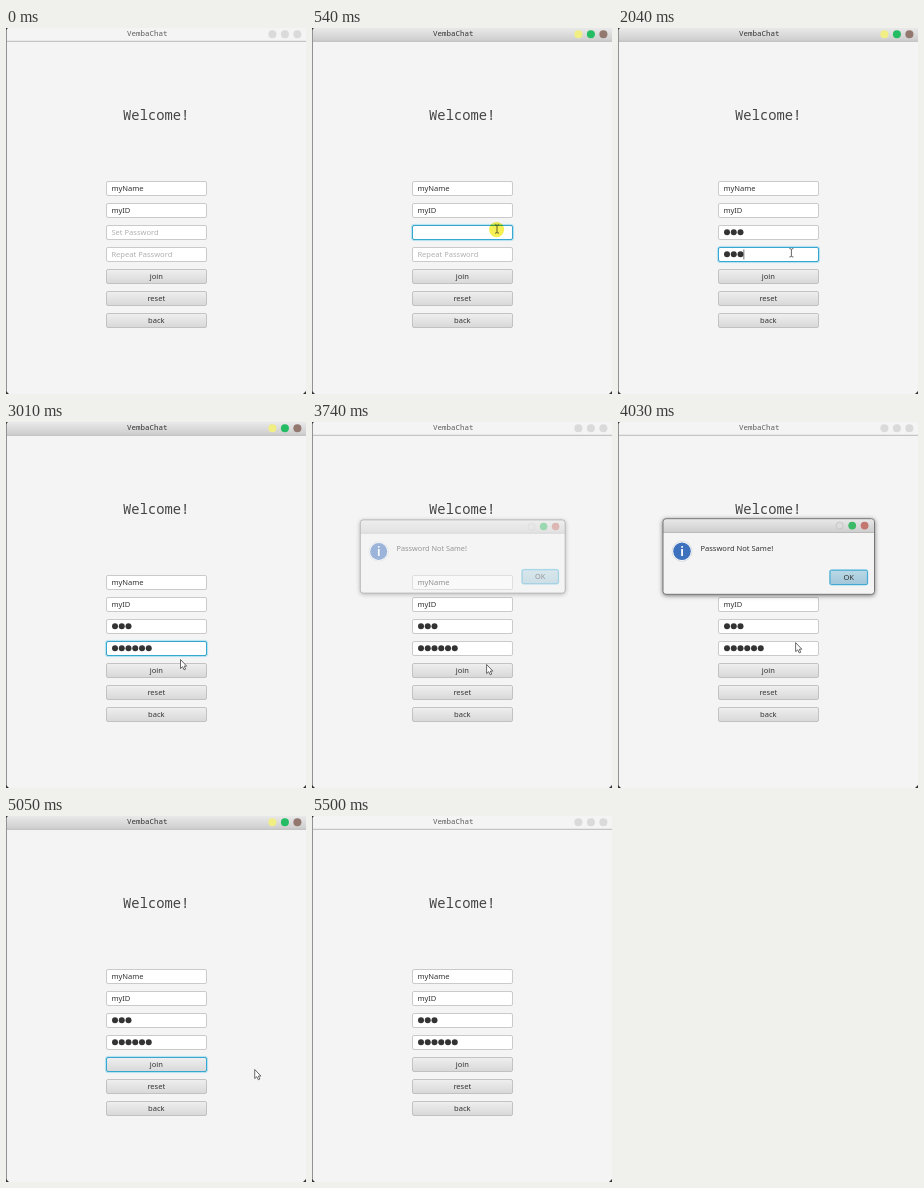
Recreate the animation shown at these times as an HTML page. Size 300 by 366 pixels, loop 5530 ms.

```html
<!DOCTYPE html>
<html lang="en">
<head>
<meta charset="utf-8">
<title>Sign up</title>
<style>
html, body { margin: 0; width: 100%; height: 100%; overflow: hidden; background: #f4f4f4; }
svg { display: block; width: 300px; height: 366px; }
text { font: 7.55px "Noto Sans", "Open Sans", sans-serif; fill: #333; }
.mono { font-family: "Noto Sans Mono", "DejaVu Sans Mono", monospace; }
.mid { text-anchor: middle; }
#title { font-size: 7.5px; }
#welcome { font-size: 13.8px; fill: #444; }
.prompt { fill: #b0b0b0; }
#dialog { filter: drop-shadow(0 1px 2px rgba(0, 0, 0, .5)); }
#click { mix-blend-mode: multiply; }
</style>
</head>
<body>
<svg id="stage" viewBox="0 0 300 366" xmlns="http://www.w3.org/2000/svg">
  <defs>
    <linearGradient id="bar" x2="0" y2="1"><stop stop-color="#e9e9e9"/><stop offset="1" stop-color="#cdcdcd"/></linearGradient>
    <linearGradient id="face" x2="0" y2="1"><stop stop-color="#efefef"/><stop offset="1" stop-color="#d8d8d8"/></linearGradient>
    <linearGradient id="pressed" x2="0" y2="1"><stop stop-color="#d9d9d9"/><stop offset="1" stop-color="#c4c4c4"/></linearGradient>
    <linearGradient id="okFace" x2="0" y2="1"><stop stop-color="#bbd9e6"/><stop offset="1" stop-color="#a2c7d9"/></linearGradient>
  </defs>
  <rect width="300" height="366" fill="#f4f4f4"/>
  <rect id="activeBar" width="300" height="13" fill="url(#bar)"/>
  <path d="M0 13.3H300" stroke="#b9b9b9"/>
  <path d="M.5 0V366" stroke="#929292"/>
  <path d="M0 0H2L0 2ZM0 366V363L3 366ZM300 366V363L297 366Z" fill="#333"/>
  <g fill="#dadada"><circle cx="266.4" cy="6.2" r="4"/><circle cx="278.9" cy="6.2" r="4"/><circle cx="291.4" cy="6.2" r="4"/></g>
  <g id="activeDots">
    <circle cx="266.4" cy="6.2" r="4" fill="#f1ee83"/>
    <circle cx="278.9" cy="6.2" r="4" fill="#24bd63"/>
    <circle cx="291.4" cy="6.2" r="4" fill="#92786f"/>
  </g>
  <text id="title" class="mono mid" x="141.2" y="8.3">VembaChat</text>
  <text id="welcome" class="mono mid" x="150.2" y="91.6">Welcome!</text>
  <g id="form"></g>
  <g id="dialog">
    <rect x="45" y="96.7" width="211.5" height="75.6" rx="3" fill="#f4f4f4"/>
    <path d="M45 110.5V99.7Q45 96.7 48 96.7H253.5Q256.5 96.7 256.5 99.7V110.5Z" fill="url(#bar)"/>
    <path d="M45 110.5H256.5" stroke="#b0b0b0" stroke-width=".8"/>
    <rect x="45" y="96.7" width="211.5" height="75.6" rx="3" fill="none" stroke="#777"/>
    <circle cx="221.7" cy="103.6" r="3.5" fill="#dcdcdc" stroke="#bdbdbd" stroke-width=".7"/>
    <circle cx="234.2" cy="103.6" r="3.9" fill="#3cba68"/>
    <circle cx="246.6" cy="103.6" r="3.9" fill="#c47670"/>
    <circle cx="64" cy="129.3" r="10" fill="#fff" stroke="#c9ced6" stroke-width=".7"/>
    <circle cx="64" cy="129.3" r="8.8" fill="#3d70bd"/>
    <text class="mid" x="64" y="133.8" style="font-size:12px;font-weight:700;fill:#fff">i</text>
    <text x="82.4" y="128.6">Password Not Same!</text>
    <rect x="211" y="147.2" width="39.4" height="16.4" rx="2.5" fill="#b9e0ef"/>
    <rect id="ok" x="212" y="148.2" width="37.4" height="14.4" rx="1.5" stroke="#38a6cf"/>
    <text class="mid" x="230.7" y="158.1">OK</text>
  </g>
  <g id="pointer">
    <path id="arrow" d="M0 0V9L2.1 7.2L3.6 10.3L5.1 9.6L3.7 6.6H6.2Z" fill="#fff" stroke="#444" stroke-width=".8"/>
    <path id="beam" d="M-2-4.2Q0-4.2 0-3.2Q0-4.2 2-4.2M0-3.2V3.2M-2 4.2Q0 4.2 0 3.2Q0 4.2 2 4.2" fill="none" stroke="#555" stroke-width=".9"/>
  </g>
  <circle id="click" r="7.6" fill="#f5ee3c" opacity=".88"/>
</svg>
<script>
const LOOP = 5530;
const $ = id => document.getElementById(id);
const set = (id, attrs) => {
  for (const key in attrs) $(id).setAttribute(key, attrs[key]);
};
const show = (id, on) => set(id, { visibility: on ? "visible" : "hidden" });
const ramp = (t, a, b) => Math.min(1, Math.max(0, (t - a) / (b - a)));
const within = (t, spans) => spans.some(([a, b]) => t >= a && t < b);
const countUntil = (t, times) => times.filter(s => t >= s).length;

const DOT_STEP = 6.75;
const fields = [
  { id: "name", y: 153, text: "myName" },
  { id: "user", y: 175, text: "myID" },
  { id: "pass", y: 197, prompt: "Set Password", focus: [430, 1370],
    keys: [790, 990, 1190], caret: [[590, 1370]] },
  { id: "again", y: 219, prompt: "Repeat Password", focus: [1370, 3490],
    keys: [1840, 1900, 2040, 2370, 2480, 2600], caret: [[1420, 1630], [1840, 2150], [2370, 2930], [3440, 3490]] }
];
const buttons = [["join", 241], ["reset", 263], ["back", 285]];

const ring = (id, y) =>
  `<g id="${id}Ring" fill="none"><rect x="99.4" y="${y - .6}" width="102.2" height="16.2" rx="2.5" stroke="#b3e0f0"/>
   <rect x="100.5" y="${y + .5}" width="100" height="14" rx="1.5" stroke="#35a7d0"/></g>`;

function fieldMarkup({ id, y, text, prompt, keys }) {
  let out = `<rect x="100.5" y="${y + .5}" width="100" height="14" rx="1.5" fill="#fff" stroke="#c6c6c6" stroke-width=".9"/>`;
  if (text) return out + `<text x="105.4" y="${y + 10.1}">${text}</text>`;
  out += ring(id, y) + `<text id="${id}Prompt" class="prompt" x="105.4" y="${y + 10.1}">${prompt}</text>`;
  keys.forEach((_, i) => {
    out += `<circle id="${id}${i}" cx="${109 + DOT_STEP * i}" cy="${y + 7.2}" r="3" fill="#333"/>`;
  });
  return out + `<path id="${id}Caret" d="M0 ${y + 2.5}V${y + 12.5}" stroke="#555" stroke-width=".8"/>`;
}

const buttonMarkup = ([label, y]) =>
  `<rect id="${label}" x="100.5" y="${y + .5}" width="100" height="14" rx="1.5" fill="url(#face)" stroke="#bebebe" stroke-width=".9"/>
   <text class="mid" x="150.3" y="${y + 10.1}">${label}</text>`;

$("form").innerHTML = fields.map(fieldMarkup).join("") + buttons.map(buttonMarkup).join("") + ring("join", 241);

// Pointer stops: time, x, y
const path = [
  [30, 240, 372], [420, 185, 201], [790, 185, 201], [1040, 183.4, 208.6],
  [1340, 175, 223.5], [1400, 173.4, 225], [2370, 173.4, 224.7], [2880, 173.4, 229.6],
  [3010, 174.5, 237.5], [3180, 174.6, 242.5], [3790, 174.6, 242.5], [4060, 178, 218],
  [4390, 215.4, 157.8], [4850, 215.4, 157.8], [5300, 290, 372]
];
const clicks = [[430, 590], [1370, 1520], [3490, 3600], [4640, 4800]];

function pointerAt(t) {
  const n = path.findIndex(p => t < p[0]);
  if (n < 1) return path[n ? path.length - 1 : 0].slice(1);
  const [t0, x0, y0] = path[n - 1], [t1, x1, y1] = path[n];
  const k = (t - t0) / (t1 - t0);
  return [x0 + (x1 - x0) * k, y0 + (y1 - y0) * k];
}

function drawField(t, { id, y, keys, prompt, focus, caret }) {
  if (!prompt) return;
  const typed = countUntil(t, keys);
  const focused = within(t, [focus]);
  show(id + "Ring", focused);
  show(id + "Prompt", !typed && !focused);
  keys.forEach((_, i) => show(id + i, i < typed));
  show(id + "Caret", within(t, caret));
  set(id + "Caret", { transform: `translate(${105.6 + DOT_STEP * typed})` });
}

function draw(t) {
  const active = ramp(t, 430, 540) - ramp(t, 3620, 3730) + ramp(t, 4800, 4940) - ramp(t, 5340, 5490);
  set("activeBar", { opacity: active });
  set("activeDots", { opacity: active });
  set("title", { opacity: .78 + .22 * active });
  fields.forEach(f => drawField(t, f));
  show("joinRing", within(t, [[3490, 3640], [4800, 5370]]));
  set("join", { fill: within(t, [[3490, 3600]]) ? "url(#pressed)" : "url(#face)" });

  const open = ramp(t, 3650, 3840) - ramp(t, 4800, 4960);
  const scale = .94 + .06 * open;
  show("dialog", open > 0);
  set("dialog", {
    opacity: open,
    transform: `translate(150.8 134.4) scale(${scale}) translate(-150.8 -134.4)`
  });
  const okFill = t >= 4640 ? "#91bacd" : t >= 4350 ? "#b9dbe9" : "url(#okFace)";
  set("ok", { fill: okFill });

  const [x, y] = pointerAt(t);
  const onField = !open && x > 100 && x < 201 && fields.some(f => y > f.y && y < f.y + 15);
  const visible = t >= 30 && t < 5300;
  set("pointer", { transform: `translate(${x} ${y})` });
  show("arrow", visible && !onField);
  show("beam", visible && onField);
  show("click", within(t, clicks));
  set("click", { cx: x - .4, cy: y + .6 });
}

const start = performance.now();
function tick() {
  draw((performance.now() - start) % LOOP);
  requestAnimationFrame(tick);
}
tick();
</script>
</body>
</html>
```
